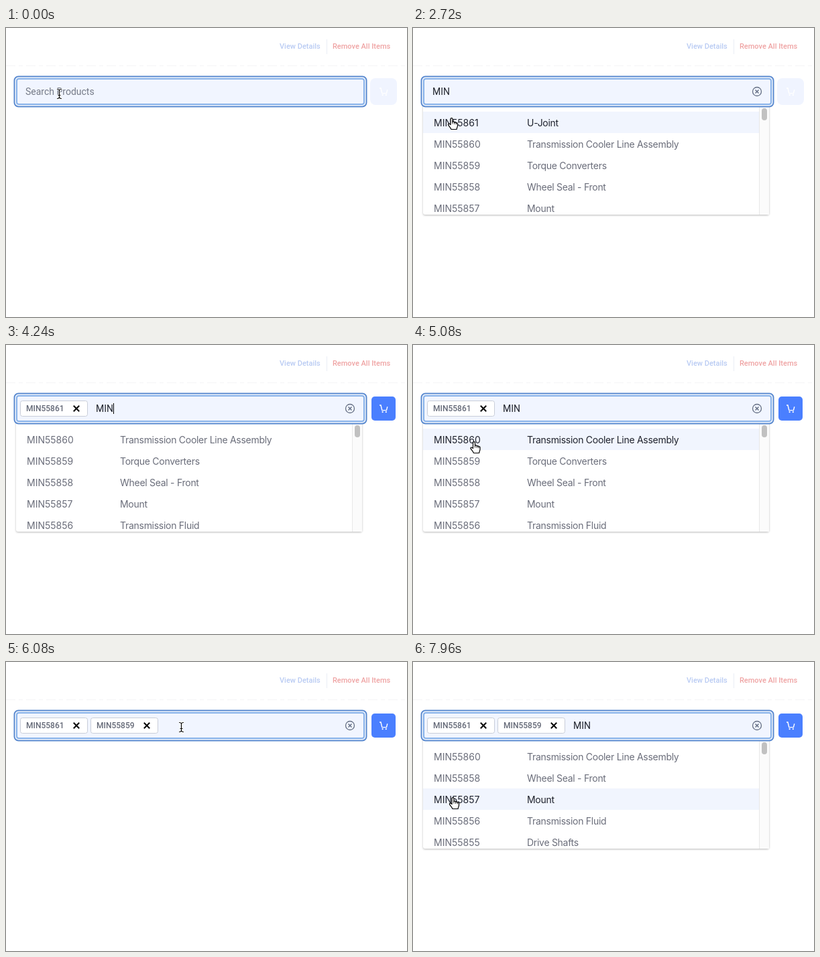
An HTML page with a canvas for the animation above (8000 ms loop, 598 px wide and 432 px high).

```html
<!DOCTYPE html>
<html lang="en">
<head>
<meta charset="utf-8">
<title>Product search</title>
<style>
html, body { margin: 0; width: 100%; height: 100%; overflow: hidden; background: #fff; }
canvas { display: block; width: 598px; height: 432px; }
</style>
</head>
<body>
<canvas id="stage"></canvas>
<script>
const W = 598, H = 432, LOOP = 8000, STEP = 40;
const canvas = document.getElementById('stage');
const ctx = canvas.getContext('2d');
const dpr = window.devicePixelRatio || 1;
canvas.width = W * dpr;
canvas.height = H * dpr;

const UI = 'Roboto, Arial, sans-serif';
const LIST = 'Inter, Arial, sans-serif';
const QUERY = 'MIN';
const PRODUCTS = [
  ['MIN55861', 'U-Joint'],
  ['MIN55860', 'Transmission Cooler Line Assembly'],
  ['MIN55859', 'Torque Converters'],
  ['MIN55858', 'Wheel Seal - Front'],
  ['MIN55857', 'Mount'],
  ['MIN55856', 'Transmission Fluid'],
  ['MIN55855', 'Drive Shafts']
];
const PICKS = [[2840, 'MIN55861'], [5520, 'MIN55859']];

// Each search: key press times, then the time it ends
const SEARCHES = [
  { keys: [80, 160, 240], end: 2840 },
  { keys: [3880, 4000, 4120], end: 5520 },
  { keys: [6760, 6840, 6960], end: LOOP }
];
const CARET_ON = [[80, 800], [1280, 1760], [2240, 2720], [2880, 3400],
  [3880, 4720], [5200, 5520], [5600, 6080], [6520, 7520]];
const POINTER_OFF = [[80, 1000], [3880, 4720], [6760, 7520]];

// time, x, y
const POINTER = [
  [0, 79, 98], [960, 79, 98], [1560, 53, 134], [2120, 53, 134], [2240, 56, 134],
  [2960, 56, 134], [3400, 160, 89], [4680, 160, 89], [5080, 89.5, 144],
  [5320, 80, 167], [5480, 80, 167], [6080, 261, 97], [7480, 261, 97], [7960, 58, 202]
];

const HAND = new Path2D('M-1.5 1.5C-1.5-.4 1.5-.4 1.5 1.5V6C2 5 4.2 5.2 4.3 6.8' +
  'C5 6 6.8 6.2 6.9 7.6C7.6 7 9 7.2 9 8.6V11.5C9 13.5 7.6 14.5 7.6 17H-.6' +
  'C-1 14.8-4.6 11.6-5 10C-5.4 8.4-3.4 7.8-1.5 10Z');
const ARROW = new Path2D('M0 0V13.2L3 10.4L5.2 15.2L7.3 14.2L5.2 9.6H9.2Z');
const BEAM = new Path2D('M-3-7Q-.6-7 0-5.6Q.6-7 3-7M0-5.6V5.6M-3 7Q-.6 7 0 5.6Q.6 7 3 7M-1.5 2H1.5');
const CART = new Path2D('M557 90H559L560.8 97.6H567.4L568.8 92.3');

const clamp = v => Math.max(0, Math.min(1, v));
const ease = v => v * v * (3 - 2 * v);
const during = (spans, t) => spans.some(([a, b]) => t >= a && t < b);

function text(str, x, y, font, color, spacing = 0) {
  ctx.font = font;
  ctx.letterSpacing = spacing + 'px';
  ctx.fillStyle = color;
  ctx.fillText(str, x, y);
}

function box(x, y, w, h, r, fill, stroke, line = 1) {
  ctx.beginPath();
  ctx.roundRect(x, y, w, h, r);
  if (fill) { ctx.fillStyle = fill; ctx.fill(); }
  if (stroke) { ctx.strokeStyle = stroke; ctx.lineWidth = line; ctx.stroke(); }
}

function cross(x, y, r, color, line) {
  ctx.beginPath();
  ctx.moveTo(x - r, y - r);
  ctx.lineTo(x + r, y + r);
  ctx.moveTo(x + r, y - r);
  ctx.lineTo(x - r, y + r);
  ctx.strokeStyle = color;
  ctx.lineWidth = line;
  ctx.stroke();
}

function pointerAt(t) {
  let i = POINTER.length - 1;
  while (i > 0 && POINTER[i][0] > t) i--;
  const a = POINTER[i], b = POINTER[i + 1] || a;
  const p = b === a ? 0 : ease((t - a[0]) / (b[0] - a[0]));
  return { x: a[1] + (b[1] - a[1]) * p, y: a[2] + (b[2] - a[2]) * p };
}

function stateAt(t) {
  const search = SEARCHES.find(s => t >= s.keys[0] && t < s.end);
  const typed = search ? search.keys.filter(k => t >= k).length : 0;
  const chips = PICKS.filter(p => t >= p[0]).map(p => p[1]);
  return {
    typed, chips,
    open: typed === QUERY.length,
    rows: PRODUCTS.filter(p => !chips.includes(p[0])).slice(0, 5),
    textX: chips.length ? 29 + 105 * chips.length : 29,
    pointer: during(POINTER_OFF, t) ? null : pointerAt(t)
  };
}

function drawHeader() {
  text('View Details', 408, 31, '500 11px ' + UI, '#b9cbf3');
  text('Remove All Items', 487, 31, '500 11px ' + UI, '#efa3a3');
  ctx.fillStyle = '#e9edf5';
  ctx.fillRect(478, 17, 1, 22);
  ctx.setLineDash([14, 5, 6, 5]);
  ctx.beginPath();
  ctx.moveTo(0, 56.5);
  ctx.lineTo(596, 56.5);
  ctx.strokeStyle = '#f4f4f6';
  ctx.lineWidth = 1;
  ctx.stroke();
  ctx.setLineDash([]);
}

function drawList(s) {
  ctx.save();
  ctx.shadowColor = 'rgba(0,0,0,.28)';
  ctx.shadowBlur = 3;
  ctx.shadowOffsetY = 1;
  box(15, 112, 516, 167, 3, '#fff');
  ctx.restore();

  ctx.save();
  ctx.beginPath();
  ctx.rect(15, 117, 516, 162);
  ctx.clip();
  const p = s.pointer;
  const active = p && p.y >= 125 && p.x < 516 ? Math.floor((p.y - 125) / 32) : -1;
  s.rows.forEach(([code, name], i) => {
    const y = 125 + 32 * i;
    const on = i === active;
    if (on) {
      ctx.fillStyle = '#f1f5fe';
      ctx.fillRect(15, y, 501, 32);
    }
    const color = on ? '#1f222c' : '#6a6d7a';
    text(code, 31, y + 22, '14px ' + LIST, color);
    text(name, 170, y + 22, '14px ' + LIST, color, -0.28);
  });
  ctx.fillStyle = '#fbfbfb';
  ctx.fillRect(516, 117, 15, 162);
  ctx.fillStyle = '#e8e8e8';
  ctx.fillRect(516, 117, 1, 162);
  box(520, 120, 8, 18, 4, '#c1c1c1');
  ctx.restore();
}

function drawField(s, t) {
  // the focus ring dims briefly while a row is being clicked
  const dim = PICKS.some(([at]) => t >= at && t < at + 80);
  ctx.globalAlpha = dim ? 0.5 : 1;
  box(12.5, 72.5, 525, 45, 6, '#f5f9ff', '#5c8bd0', 2);
  ctx.globalAlpha = 1;
  box(16, 76, 518, 38, 3, '#f1f5ff', '#86b1e9', 2);

  s.chips.forEach((code, i) => {
    const x = 21 + 105 * i;
    box(x + 0.5, 83.5, 100, 23, 3, '#fff', '#c9cdd8');
    text(code, x + 9, 99, '500 12px ' + UI, '#646977');
    cross(x + 84, 95, 4.2, '#000', 2);
  });

  if (s.typed) text(QUERY.slice(0, s.typed), s.textX, 100, '14px ' + UI, '#23262f');
  else if (!s.chips.length) text('Search Products', 29, 100, '14px ' + UI, '#757a87');

  if (during(CARET_ON, t)) {
    ctx.font = '14px ' + UI;
    ctx.letterSpacing = '0px';
    const w = ctx.measureText(QUERY.slice(0, s.typed)).width;
    ctx.fillStyle = '#000';
    ctx.fillRect(Math.round(s.textX + w), 87, 1, 16);
  }

  if (s.typed || s.chips.length) {
    ctx.beginPath();
    ctx.arc(513, 95, 6.5, 0, 7);
    ctx.strokeStyle = '#667085';
    ctx.lineWidth = 1.3;
    ctx.stroke();
    cross(513, 95, 2.5, '#667085', 1.5);
  }
}

function drawCart(t) {
  const p = ease(clamp((t - 2880) / 240));
  ctx.globalAlpha = 1 - p;
  box(543, 75, 40, 40, 8, '#f0f4ff');
  ctx.globalAlpha = p;
  box(545, 77, 36, 36, 5, '#4a7fff');
  ctx.globalAlpha = 1;
  ctx.strokeStyle = ctx.fillStyle = '#fff';
  ctx.lineWidth = 1.4;
  ctx.stroke(CART);
  for (const x of [561.6, 566.8]) {
    ctx.beginPath();
    ctx.arc(x, 100.2, 1.1, 0, 7);
    ctx.fill();
  }
}

function drawPointer(s) {
  const { x, y } = s.pointer;
  const inField = y > 76 && y < 114 && x > s.textX - 8;
  ctx.save();
  ctx.lineJoin = ctx.lineCap = 'round';
  if (inField) {
    ctx.translate(Math.round(x) + 0.5, Math.round(y) + 0.5);
    ctx.strokeStyle = '#fff';
    ctx.lineWidth = 2.6;
    ctx.stroke(BEAM);
    ctx.strokeStyle = '#000';
    ctx.lineWidth = 1.2;
    ctx.stroke(BEAM);
  } else if (s.open && y >= 125) {
    ctx.translate(x + 1.5, y + 0.5);
    ctx.fillStyle = '#fff';
    ctx.fill(HAND);
    ctx.strokeStyle = '#000';
    ctx.lineWidth = 1.2;
    ctx.stroke(HAND);
    ctx.lineWidth = 0.9;
    ctx.stroke(new Path2D('M1.5 6V8.5M4.3 6.8V9M6.9 7.6V9.4'));
  } else {
    ctx.translate(x, y);
    ctx.strokeStyle = '#fff';
    ctx.lineWidth = 2;
    ctx.stroke(ARROW);
    ctx.fillStyle = '#000';
    ctx.fill(ARROW);
  }
  ctx.restore();
}

function draw(t) {
  const s = stateAt(t);
  ctx.setTransform(dpr, 0, 0, dpr, 0, 0);
  ctx.fillStyle = '#fff';
  ctx.fillRect(0, 0, W, H);
  drawHeader();
  if (s.open) drawList(s);
  drawField(s, t);
  drawCart(t);
  if (s.pointer) drawPointer(s);
}

const start = performance.now();
function tick() {
  const t = (performance.now() - start) % LOOP;
  draw(Math.floor(t / STEP) * STEP);
  requestAnimationFrame(tick);
}
tick();
</script>
</body>
</html>
```
